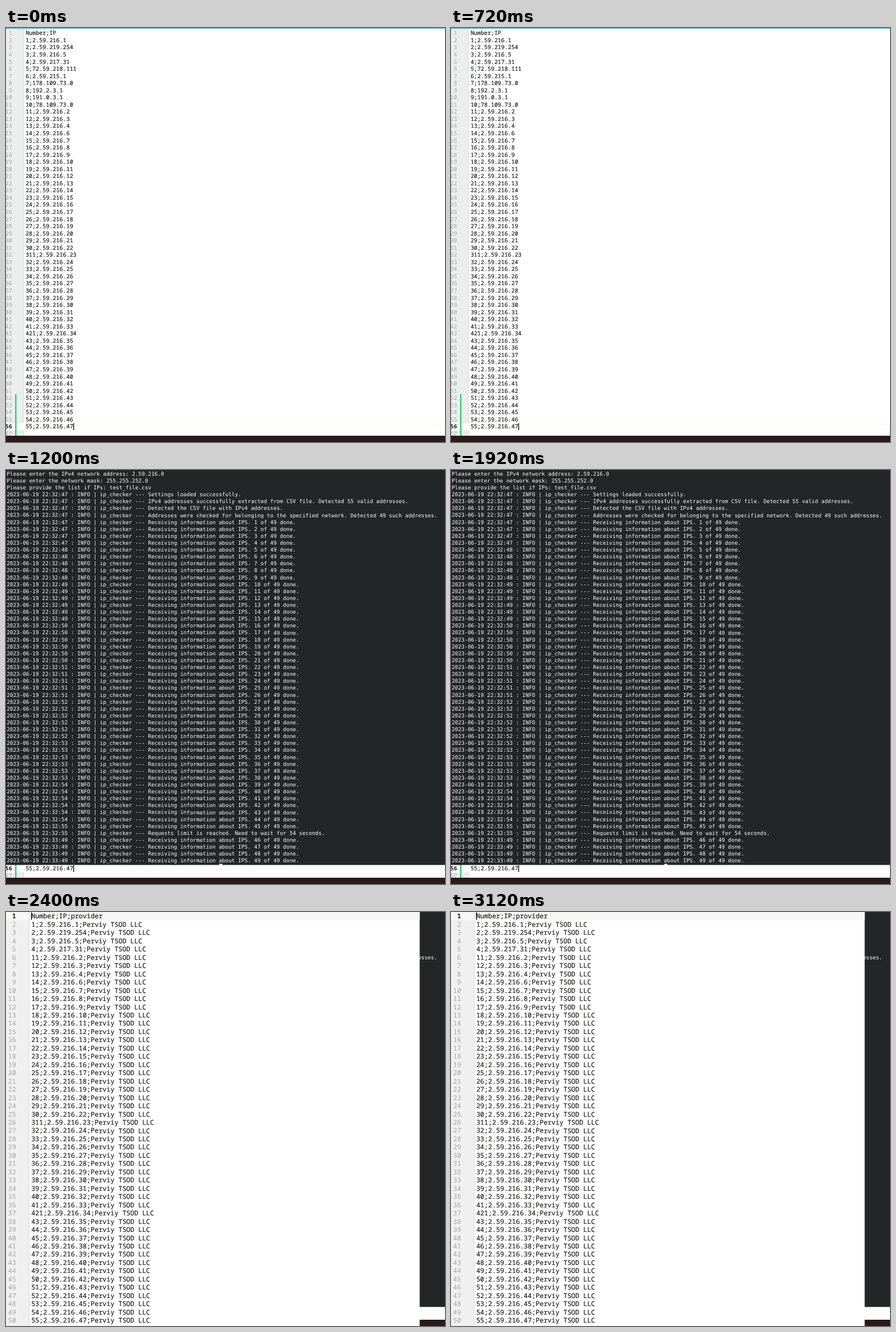
Animation of 771x726 px, one loop 3.6 s. Source, as an HTML page:

```html
<!DOCTYPE html>
<html lang="en">
<head>
<meta charset="utf-8">
<title>IP checker</title>
<style>
  html, body { margin: 0; width: 100%; height: 100%; overflow: hidden; background: #fff; }
  svg { display: block; width: 771px; height: 726px; }
  text { white-space: pre; text-rendering: geometricPrecision; }
  .edit { font-family: "Noto Sans Mono", monospace; fill: #1f1c1b; }
  .body { stroke: #1f1c1b; stroke-width: .2; }
  .term { font-family: "DejaVu Sans Mono", monospace; fill: #fcfcfc; }
  .num { fill: #a2a3a3; text-anchor: end; }
  .now { fill: #1e1e1e; font-weight: bold; }
</style>
</head>
<body>
<svg id="stage" viewBox="0 0 771 726"></svg>
<script>
const LOOP = 3600;
const stage = document.getElementById('stage');

function add(parent, tag, attrs, text) {
  const node = document.createElementNS('http://www.w3.org/2000/svg', tag);
  for (const key in attrs) node.setAttribute(key, attrs[key]);
  if (text !== undefined) node.textContent = text;
  parent.append(node);
  return node;
}

const layer = () => add(stage, 'g', {});
const box = (g, x, y, width, height, fill) => add(g, 'rect', { x, y, width, height, fill });

// An invisibly small skew keeps baselines from snapping to whole pixels.
const textBlock = (g, cls, size) =>
  add(g, 'g', { class: cls, 'font-size': size, transform: 'matrix(1 .0001 0 1 0 0)' });

function lines(g, rows, { x, y, pitch, size, cls }) {
  const block = textBlock(g, cls, size);
  rows.forEach((row, i) => add(block, 'text', { x, y: y + i * pitch }, row));
}

function lineNumbers(g, count, current, { numX, y, pitch, size }) {
  const block = textBlock(g, 'edit', size);
  for (let n = 1; n <= count; n++) {
    const cls = n === current ? 'num now' : 'num';
    add(block, 'text', { x: numX, y: y + (n - 1) * pitch, class: cls }, n);
  }
}

// Address list
const first = ['2.59.216.1', '2.59.219.254', '2.59.216.5', '2.59.217.31', '72.59.218.111',
  '2.59.215.1', '178.109.73.0', '192.2.3.1', '191.0.3.1', '78.109.73.0'];
const records = Array.from({ length: 55 }, (_, i) => {
  const n = i + 1;
  const label = n === 31 || n === 42 ? n + '1' : n;
  const ip = first[i] || '2.59.216.' + (n < 14 ? n - 9 : n - 8);
  return label + ';' + ip;
});

function drawInput(g) {
  const font = { x: 34.4, numX: 10.6, y: 12.4, pitch: 12.545, size: 9.95, cls: 'edit body' };
  box(g, 0, 0, 771, 726, '#ffffff');
  box(g, 0, 0, 31, 715, '#eceeee');
  box(g, 30.5, 0, 1, 715, '#d5d8d8');
  box(g, 0, 693, 771, 12.5, '#fdfdfc');
  box(g, 0, 0, 771, 1.6, '#7fb9d2');
  lineNumbers(g, 57, 56, font);
  box(g, 16, 642, 2.4, 73, '#2ecc71');
  lines(g, ['Number;IP', ...records], font);
  box(g, 118, 693, 1.5, 12, '#1f1c1b');
  box(g, 0, 715, 771, 11, '#2b1a1a');
}

// Terminal log
const secondStarts = [5, 10, 16, 22, 27, 33, 39, 45];

function logRows() {
  const entry = (time, message) => `2023-06-19 22:${time} : INFO | ip_checker --- ${message}`;
  const rows = [
    'Please enter the IPv4 network address: 2.59.216.0',
    'Please enter the network mask: 255.255.252.0',
    'Please provide the list if IPs: test_file.csv',
    entry('32:47', 'Settings loaded successfully.'),
    entry('32:47', 'IPv4 addresses successfully extracted from CSV file. Detected 55 valid addresses.'),
    entry('32:47', 'Detected the CSV file with IPv4 addresses.'),
    entry('32:47', 'Addresses were checked for belonging to the specified network. Detected 49 such addresses.')
  ];
  for (let n = 1; n <= 49; n++) {
    const time = n > 45 ? '33:49' : '32:' + (47 + secondStarts.filter(s => s <= n).length);
    rows.push(entry(time, `Receiving information about IPS. ${n} of 49 done.`));
    if (n === 45) rows.push(entry(time, 'Requests limit is reached. Need to wait for 54 seconds.'));
  }
  return rows;
}

function drawTerminal(g) {
  box(g, 0, 0, 771, 692.6, '#232627');
  lines(g, logRows(), { x: 1.2, y: 9.8, pitch: 12.116, size: 9.4, cls: 'term' });
  box(g, 374.5, 690.6, 5.6, 2.2, '#fcfcfc');
}

// Report with providers
function drawReport(g) {
  const font = { x: 44.4, numX: 17.6, y: 11.4, pitch: 14.465, size: 11.6, cls: 'edit body' };
  const kept = records.filter((_, i) => i < 4 || i > 9);
  box(g, 0, 0, 726.5, 726, '#ffffff');
  box(g, 0, 0, 41, 726, '#f0f0f0');
  box(g, 0, 0, 726.5, 14.4, '#f8f7f6');
  box(g, 40.3, 0, 1, 726, '#d6d6d6');
  lineNumbers(g, 50, 1, font);
  lines(g, ['Number;IP;provider', ...kept.map(r => r + ';Perviy TSOD LLC')], font);
  box(g, 44, 0.5, 1.4, 13.5, '#1f1c1b');
}

const scenes = [
  { draw: drawInput, at: 0 },
  { draw: drawTerminal, at: 1200 },
  { draw: drawReport, at: 2400 }
];

for (const { draw, at } of scenes) {
  const g = layer();
  draw(g);
  if (!at) continue;
  g.animate([
    { opacity: 0, offset: 0, easing: 'step-end' },
    { opacity: 1, offset: at / LOOP, easing: 'step-end' },
    { opacity: 1, offset: 1 }
  ], { duration: LOOP, iterations: Infinity });
}
</script>
</body>
</html>
```
